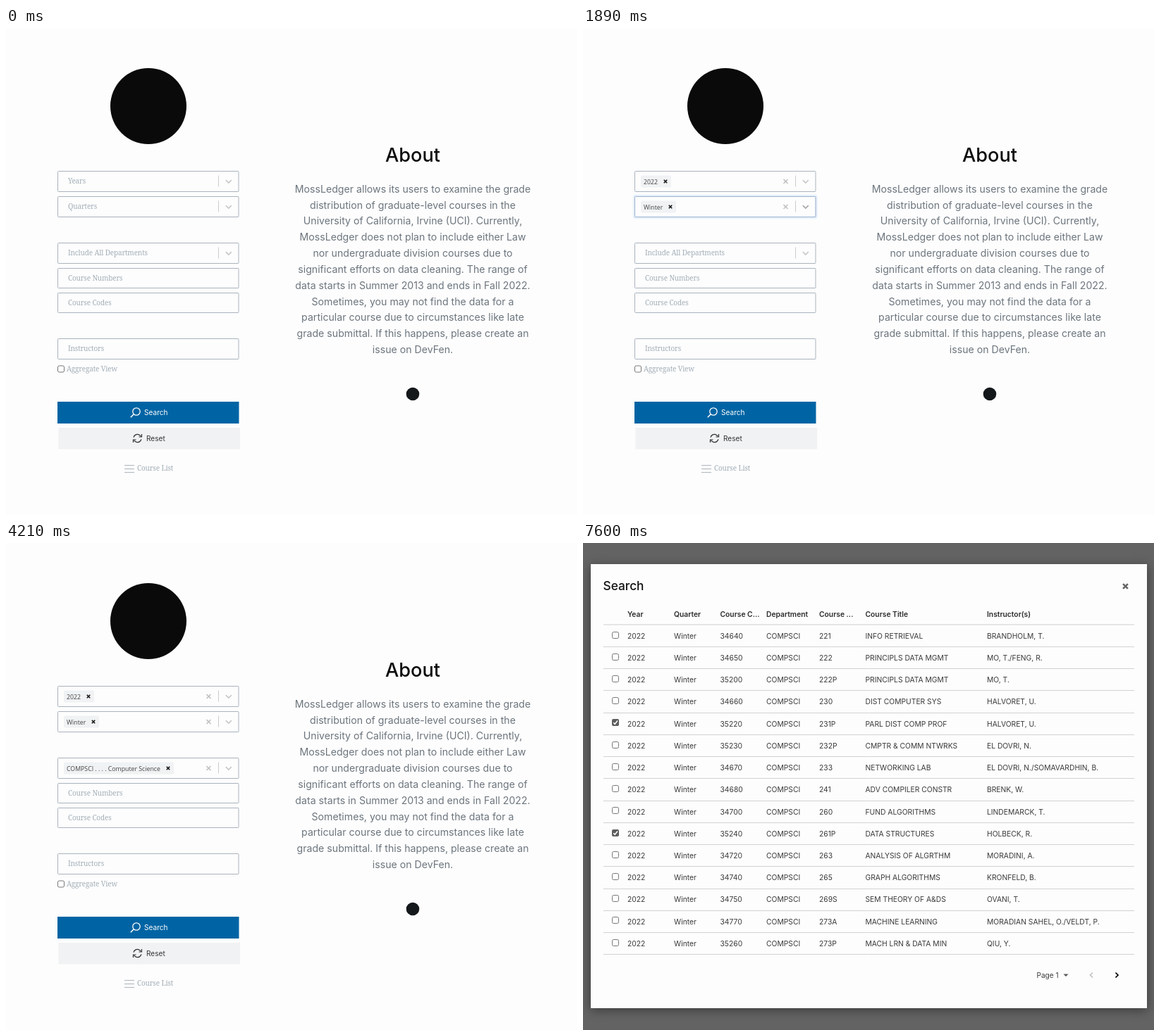
Write an HTML page with a canvas that moves like this. It is 810 by 692 pixels and loops after 8000 ms.

```html
<!DOCTYPE html>
<html lang="en">
<head>
<meta charset="utf-8">
<title>Course grades</title>
<style>
html, body { margin: 0; width: 100%; height: 100%; overflow: hidden; background: #fdfdfd; }
canvas { display: block; }
</style>
</head>
<body>
<canvas id="stage" width="810" height="692"></canvas>
<script>
const ctx = document.getElementById('stage').getContext('2d');
const LOOP = 8000;
const SANS = 'Inter, "Noto Sans", sans-serif';
const MENU = '"Open Sans", "Noto Sans", sans-serif';
const SLAB = '"Noto Serif", serif';
const PAPER = '#fdfdfd', MUTED = '#a2aeb7', BORDER = '#a9b3bd';

const clamp = v => Math.max(0, Math.min(1, v));
const fade = (t, from, ms = 120) => clamp((t - from) / ms);
const mix = (a, b, p) => `rgb(${a.map((v, i) => Math.round(v + (b[i] - v) * p))})`;

function text(s, x, y, font, color, align = 'left', spacing = 0) {
  ctx.font = font;
  ctx.fillStyle = color;
  ctx.textAlign = align;
  ctx.letterSpacing = spacing + 'px';
  ctx.fillText(s, x, y);
}
const slab = (s, x, y) => text(s, x, y, `10px ${SLAB}`, MUTED, 'left', -0.15);

function rect(x, y, w, h, color) {
  ctx.fillStyle = color;
  ctx.fillRect(x, y, w, h);
}

function line(points, color, width = 1) {
  ctx.beginPath();
  points.forEach(([x, y], i) => i ? ctx.lineTo(x, y) : ctx.moveTo(x, y));
  ctx.strokeStyle = color;
  ctx.lineWidth = width;
  ctx.stroke();
}

function shape(points, color) {
  ctx.beginPath();
  points.forEach(([x, y]) => ctx.lineTo(x, y));
  ctx.fillStyle = color;
  ctx.fill();
}

function disc(x, y, r, color) {
  ctx.beginPath();
  ctx.arc(x, y, r, 0, Math.PI * 2);
  ctx.fillStyle = color;
  ctx.fill();
}

function arc(x, y, r, a, b, color, width) {
  ctx.beginPath();
  ctx.arc(x, y, r, a, b);
  ctx.strokeStyle = color;
  ctx.lineWidth = width;
  ctx.stroke();
}

function round(x, y, w, h, r, fill, stroke, width = 1) {
  ctx.beginPath();
  ctx.roundRect(x, y, w, h, r);
  if (fill) { ctx.fillStyle = fill; ctx.fill(); }
  if (stroke) { ctx.strokeStyle = stroke; ctx.lineWidth = width; ctx.stroke(); }
}

function cross(x, y, r, color, width) {
  line([[x - r, y - r], [x + r, y + r]], color, width);
  line([[x - r, y + r], [x + r, y - r]], color, width);
}

// ---- Form ----

const ABOUT = [
  'MossLedger allows its users to examine the grade',
  'distribution of graduate-level courses in the',
  'University of California, Irvine (UCI). Currently,',
  'MossLedger does not plan to include either Law',
  'nor undergraduate division courses due to',
  'significant efforts on data cleaning. The range of',
  'data starts in Summer 2013 and ends in Fall 2022.',
  'Sometimes, you may not find the data for a',
  'particular course due to circumstances like late',
  'grade submittal. If this happens, please create an',
  'issue on DevFen.'
];

const YEARS = Array.from({ length: 10 }, (_, i) => String(2022 - i));
const QUARTERS = ['Fall', 'Winter', 'Spring', 'Summer'];
const ALL = [
  'AC ENG . . . . . .Academic English',
  'AFAM . . . . . . African American Studies',
  'ANATOMY . . . .Anatomy and Neurobiology',
  'ANESTH . . . . . Anesthesiology',
  'ANTHRO . . . . . Anthropology',
  'ARABIC . . . . . .Arabic',
  'ARMN . . . . . . .Armenian',
  'ART . . . . . . . . .Art',
  'ART HIS . . . . . Art History'
];
const COMP = [
  'COM LIT . . . . . Comparative Literature',
  'COMPSCI . . . . Computer Science',
  'CSE . . . . . . . . Computer Science and|Engineering',
  'EECS . . . . . . . Electrical Engineering & Computer|Science',
  'I&C SCI . . . . . . Information and Computer|Science'
];
const WITH_C = [ALL[0], ALL[1], ALL[5],
  'BIOCHEM . . . . Biological Chemistry',
  'CHEM . . . . . . . Chemistry',
  'CHINESE . . . . . Chinese',
  'CLASSIC . . . . . Classics', COMP[0], COMP[1]];
const WITH_CO = [...COMP.slice(0, 3), 'ECON . . . . . . . Economics', ...COMP.slice(3)];

const ROW = 26.65, EXTRA = 16.1;
const rowHeight = s => s.includes('|') ? ROW + EXTRA : ROW;

function scrollbar(top, thumb) {
  rect(318, top, 12, 227, '#f1f1f1');
  rect(319, top + 12, 10, thumb, '#c1c1c1');
  shape([[321, top + 8], [324, top + 5], [327, top + 8]], '#8a8a8a');
  shape([[321, top + 219], [324, top + 222], [327, top + 219]], '#444');
}

function menu(top, items, active, thumb) {
  const full = items.reduce((h, s) => h + rowHeight(s), 18.5);
  const h = Math.min(full, 241);
  ctx.save();
  ctx.shadowColor = 'rgba(0,0,0,.14)';
  ctx.shadowBlur = 8;
  ctx.shadowOffsetY = 3;
  round(73, top, 257.5, h, 2, PAPER);
  ctx.restore();
  round(72.5, top - 0.5, 258, h + 1, 2, null, '#dcdcdc');

  ctx.save();
  ctx.beginPath();
  ctx.rect(73, top + 7, 257, h - 14);
  ctx.clip();
  let y = top + 9.5;
  items.forEach((item, i) => {
    const rh = rowHeight(item);
    if (i === active) rect(73, y, 257, rh, '#f0f1f3');
    item.split('|').forEach((s, k) =>
      text(s, 88.5, y + 17.2 + k * EXTRA, `10.1px ${MENU}`, '#111'));
    y += rh;
  });
  ctx.restore();
  if (thumb) scrollbar(top + 7, thumb);
}

function chip(label, y, w) {
  round(82, y + 6, w, 17, 2, '#f0f2f4');
  text(label, 86, y + 18, `8.75px ${MENU}`, '#444');
  cross(82 + w - 8, y + 14.5, 2.2, '#111', 1.6);
}

function field(label, y, h = 29) {
  round(73.5, y, 256.5, h, 1, PAPER, BORDER);
  if (label) slab(label, 88, y + 17.5);
}

function select(o, t) {
  const { y } = o;
  const focus = t < o.pick ? fade(t, o.open) : 1 - fade(t, o.pick);
  const isOpen = t >= o.open && t < o.pick;
  const typed = isOpen && o.typed ? o.typed(t) : '';
  if (focus) round(72.2, y - 1.3, 259.1, 31.6, 2, null, `rgba(60,140,245,${0.32 * focus})`, 2.8);
  field('', y);
  if (focus) round(73.5, y, 256.5, 29, 1, null, `rgba(125,178,245,${focus})`);
  line([[301.5, y + 6], [301.5, y + 22]], '#ccc');
  line([[311.8, y + 12.6], [315.8, y + 16.6], [319.8, y + 12.6]],
    mix([200, 200, 200], [95, 95, 95], focus), 1.6);
  if (t >= o.pick) {
    chip(o.chip, y, o.chipW);
    cross(287.5, y + 14.5, 3, '#bdbdbd', 1.5);
    return;
  }
  slab(typed || o.label, 88, y + 17.5);
  if (isOpen && o.caret(t)) {
    const x = 88.5 + (typed ? ctx.measureText(typed).width : 0);
    line([[x, y + 8], [x, y + 20]], '#aaa');
  }
}

const years = {
  y: 203.5, label: 'Years', chip: '2022', chipW: 43, open: 120, pick: 900,
  caret: t => t < 690
};
const quarters = {
  y: 239.5, label: 'Quarters', chip: 'Winter', chipW: 50, open: 1230, pick: 1810,
  caret: t => t < 1770
};
const KEYS = [[3840, ''], [3070, 'comp'], [2990, 'com'], [2830, 'co'], [2750, 'c'], [0, '']];
const departments = {
  y: 305.5, label: 'Include All Departments', chip: 'COMPSCI . . . . Computer Science',
  chipW: 156, open: 2180, pick: 4090,
  typed: t => KEYS.find(k => t >= k[0])[1],
  caret: t => (t < 2710 || t >= 2750) && (t < 3550 || t >= 3840)
};

function departmentMenu(t) {
  const top = 341, typed = departments.typed(t);
  if (typed === '') menu(top, ALL, 0, 13);
  else if (typed === 'c') menu(top, WITH_C, 0, 22);
  else if (typed === 'co') menu(top, WITH_CO, 0, 150);
  else menu(top, COMP, t >= 3230 ? 1 : 0);
}

function resetIcon(x, y, color) {
  arc(x, y, 5.6, Math.PI * 1.08, Math.PI * 1.85, color, 1.3);
  arc(x, y, 5.6, Math.PI * 0.08, Math.PI * 0.85, color, 1.3);
  line([[x + 6, y - 6], [x + 6, y - 2], [x + 2, y - 2]], color, 1.2);
  line([[x - 6, y + 6], [x - 6, y + 2], [x - 2, y + 2]], color, 1.2);
}

function form(t) {
  rect(0, 0, 810, 692, PAPER);
  disc(202, 111, 54, '#0a0a0a');

  text('About', 577, 190, `500 27.2px ${SANS}`, '#0c0c0c', 'center');
  ABOUT.forEach((s, i) =>
    text(s, 577, 233.8 + i * 22.82, `14.15px ${SANS}`, '#6c757d', 'center'));
  disc(577, 520, 9.3, '#15181b');

  field('Course Numbers', 341.5, 28);
  field('Course Codes', 376.5, 28);
  field('Instructors', 441.5);
  round(73.5, 480, 9, 9, 2, '#fff', '#767676');
  slab('Aggregate View', 86, 487.5);

  rect(73, 531, 257.5, 31, '#0064a4');
  arc(185, 545, 5.2, 0, Math.PI * 2, '#fff', 1.3);
  line([[181.2, 548.8], [176.8, 553.2]], '#fff', 1.5);
  text('Search', 196, 550, `10.1px ${SANS}`, '#fff');
  rect(74.5, 568, 257.5, 30.5, '#f1f2f4');
  resetIcon(186.5, 583, '#333');
  text('Reset', 199, 586.5, `10.1px ${SANS}`, '#333');
  for (const y of [621.5, 626.5, 631.5]) line([[168, y], [182, y]], '#b4bcc2', 1.2);
  slab('Course List', 186, 629);

  [years, quarters, departments].forEach(o => select(o, t));
  if (t >= years.open && t < years.pick) menu(239, YEARS, 0, 170);
  if (t >= quarters.open && t < quarters.pick) menu(275, QUARTERS, t >= 1600 ? 1 : 0);
  if (t >= departments.open && t < departments.pick) departmentMenu(t);
}

// ---- Results ----

const COLS = [63, 129, 194.5, 260, 335, 400.5, 573];
const HEADS = ['Year', 'Quarter', 'Course C...', 'Department', 'Course ...', 'Course Title', 'Instructor(s)'];
const COURSES = `34640;221;INFO RETRIEVAL;BRANDHOLM, T.
34650;222;PRINCIPLS DATA MGMT;MO, T./FENG, R.
35200;222P;PRINCIPLS DATA MGMT;MO, T.
34660;230;DIST COMPUTER SYS;HALVORET, U.
35220;231P;PARL DIST COMP PROF;HALVORET, U.
35230;232P;CMPTR & COMM NTWRKS;EL DOVRI, N.
34670;233;NETWORKING LAB;EL DOVRI, N./SOMAVARDHIN, B.
34680;241;ADV COMPILER CONSTR;BRENK, W.
34700;260;FUND ALGORITHMS;LINDEMARCK, T.
35240;261P;DATA STRUCTURES;HOLBECK, R.
34720;263;ANALYSIS OF ALGRTHM;MORADINI, A.
34740;265;GRAPH ALGORITHMS;KRONFELD, B.
34750;269S;SEM THEORY OF A&DS;OVANI, T.
34770;273A;MACHINE LEARNING;MORADIAN SAHEL, O./VELDT, P.
35260;273P;MACH LRN & DATA MIN;QIU, Y.`.split('\n').map(r => {
  const [code, num, title, who] = r.split(';');
  return ['2022', 'Winter', code, 'COMPSCI', num, title, who];
});
const PITCH = 31.23;

// Row under the pointer as it travels down the checkbox column.
function hoverRow(t) {
  if (t < 5730) return -1;
  if (t < 5930) return 6 - Math.floor((t - 5730) / 100);
  if (t < 6300) return 4;
  if (t < 6500) return 5 + Math.floor((t - 6300) / 50);
  return t < 7000 ? 9 : -1;
}

function checkbox(x, y, on, hover) {
  if (on) {
    round(x - 5, y - 5, 10, 10, 2, '#5f5f5f');
    line([[x - 2.8, y + 0.2], [x - 0.8, y + 2.3], [x + 3, y - 2.5]], '#fff', 1.5);
  } else {
    round(x - 4.5, y - 4.5, 9, 9, 2, '#fff', hover ? '#4f4f4f' : '#767676');
  }
}

function results(t) {
  rect(0, 0, 810, 692, '#636363');
  ctx.save();
  ctx.shadowColor = 'rgba(0,0,0,.4)';
  ctx.shadowBlur = 14;
  ctx.shadowOffsetY = 3;
  rect(11, 30, 789, 631, PAPER);
  ctx.restore();

  text('Search', 28.5, 67, `500 17.3px ${SANS}`, '#111');
  cross(769.5, 61.5, 3.4, mix([5, 5, 5], [100, 100, 100], fade(t, 6140, 160)), 2.5);

  HEADS.forEach((s, i) => text(s, COLS[i], 105, `600 10.3px ${SANS}`, '#2c2c2c'));
  line([[29, 116], [782, 116]], '#cfcfcf');
  const hover = hoverRow(t);
  COURSES.forEach((row, i) => {
    const y = i * PITCH;
    const on = (i === 4 && t >= 6140) || (i === 9 && t >= 6950);
    checkbox(46, Math.round(130.5 + y), on, i === hover);
    row.forEach((s, c) => text(s, COLS[c], 135.7 + y, `10.3px ${SANS}`, '#3a3a3a'));
    const ly = Math.round(147 + y) + 0.5;
    line([[29, ly], [782, ly]], '#d2d2d2');
  });

  text('Page 1', 643.5, 617.6, `10.1px ${SANS}`, '#3a3a3a');
  shape([[681.5, 612.5], [688.5, 612.5], [685, 616]], '#555');
  line([[723, 610.5], [719.5, 614], [723, 617.5]], '#bdbdbd', 1.5);
  line([[755.5, 610.5], [759, 614], [755.5, 617.5]], t >= 7600 ? '#000' : '#444', 1.7);
}

const began = performance.now();
function frame(now) {
  const t = Math.max(0, now - began) % LOOP;
  if (t < 5070) form(t); else results(t);
  requestAnimationFrame(frame);
}
requestAnimationFrame(frame);
</script>
</body>
</html>
```
